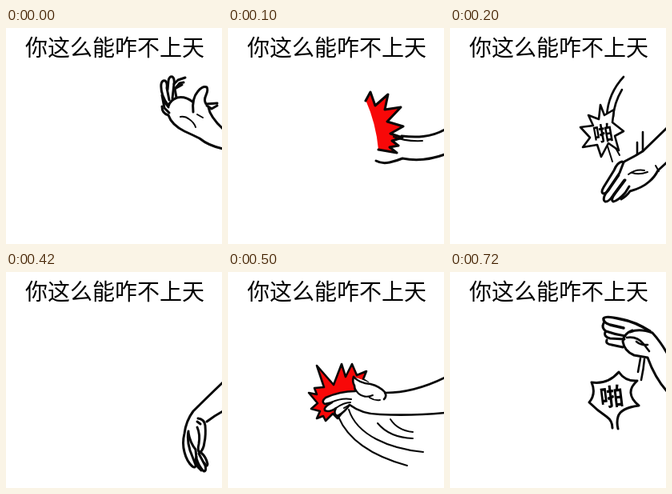
An HTML page that plays this animation: 270x270 px, repeating every 800 ms.

```html
<!DOCTYPE html>
<html lang="zh-CN">
<head>
<meta charset="utf-8">
<title>你这么能咋不上天</title>
<style>
html, body { margin: 0; width: 100%; height: 100%; overflow: hidden; background: #fff; }
svg { display: block; width: 100%; height: 100%; }
text { font-family: "Noto Sans CJK SC", "Noto Sans CJK", sans-serif; fill: #000; stroke: none; }
.pose { fill: none; stroke: #080808; stroke-width: 3; stroke-linecap: round; stroke-linejoin: round; opacity: 0; }
.thin { stroke-width: 2; }
.mid { stroke-width: 2.6; }
.bold { stroke-width: 3.4; }
.skin { fill: #fff; }
.bare { fill: #fff; stroke: none; }
.red { fill: #f80808; }
.flat { fill: #f80808; stroke: none; }
.slap { font-weight: 700; text-anchor: middle; }
</style>
</head>
<body>
<svg viewBox="0 0 270 270">
  <rect width="270" height="270" fill="#fff"/>
  <text x="24" y="35" font-size="28">你这么能咋不上天</text>

  <g class="pose" id="raised">
    <path d="M203 97C197 90 193 79 194 70Q195 65 199 66Q202 68 201 75L204 90"/>
    <path d="M202 77L203 66Q204 60 208 61Q211 63 210 70L208 88"/>
    <path d="M210 70L215 65L224 62M212 75L217 69L222 68M213 87L211 76L220 71"/>
    <path d="M195 84L198 100L204 106M198 92L203 99M203 98Q205 90 214 87Q224 85 233 92"/>
    <path d="M195 98Q195 107 203 109Q207 121 223 129Q234 134 242 138Q253 147 271 151"/>
    <path d="M234 105Q232 88 240 79Q246 72 251 74Q253 77 250 84Q247 90 250 95L264 94M251 97L257 101L264 97M253 99Q255 111 271 126"/>
    <path class="thin" d="M218 111Q224 110 229 114Q235 118 237 124M239 108L246 112"/>
  </g>

  <g class="pose" id="impact">
    <path class="flat" d="M172 90L178 80L184 97L200 83L196 102L216 99L199 117L219 123L203 132L218 137L207 142L214 148L203 149L211 157L188 152Q185 119 172 90Z"/>
    <path d="M172 91L178 80L184 97L200 83L196 102L216 99L199 117L219 123L203 132L218 137L205 141L213 147L202 149L211 156L188 152"/>
    <path d="M217 135C235 137 253 137 271 127M185 166Q192 170 202 168Q211 166 218 163Q244 168 271 158"/>
    <path class="thin" d="M207 136Q222 142 243 141"/>
  </g>

  <g class="pose" id="downswing">
    <path class="mid" d="M217 61C204 75 197 91 196 110M215 77Q205 94 204 111"/>
    <path class="thin" d="M197 148L203 167M207 150L212 159"/>
    <path class="skin mid" d="M188 96L193 109L205 102L203 118L217 129L206 135L211 153L198 144L189 161L184 146L166 149L175 137L163 124L179 122L173 109L186 114Z"/>
    <text class="slap" x="191" y="141" font-size="25" transform="rotate(-10 191 131)">啪</text>
    <path d="M271 125L241 154L231 160L216 168"/>
    <path class="mid" d="M241 130V154M234 143V158"/>
    <path d="M215 167Q209 168 205 178L192 199Q188 206 192 207Q196 207 200 200L211 184"/>
    <path d="M217 168L212 181L195 206Q190 215 194 217Q198 218 204 209L218 190"/>
    <path d="M219 190L207 206Q200 215 204 217Q210 216 219 206L224 198M214 214Q221 210 225 204Q240 200 249 192Q256 186 260 178L271 168"/>
    <path class="thin" d="M223 183Q232 176 243 178M228 181Q236 184 247 180M257 172L261 179"/>
  </g>

  <g class="pose" id="hanging">
    <path d="M271 138Q251 157 234 174Q225 186 223 202Q220 214 223 225Q226 237 233 243Q237 246 237 241L230 223Q226 210 228 199"/>
    <path d="M271 174Q260 180 251 187M240 183Q248 184 249 192Q250 204 248 213Q247 222 242 226Q239 223 241 215Q243 203 239 194"/>
    <path d="M228 201Q230 213 237 222L238 233Q241 243 247 249Q251 249 249 242L241 227"/>
    <path d="M244 226Q250 231 252 240Q251 245 248 239M238 231Q236 237 240 244L244 248M239 187L243 190"/>
  </g>

  <g class="pose" id="backhand">
    <path class="red mid" d="M108 145L120 144L111 117L132 141L142 115L147 131L155 115L161 129L173 124L169 134L175 138L151 166L137 183L131 177L122 186L119 180L111 183L115 174L104 171L112 164L101 151L111 153Z"/>
    <path class="bare" d="M157 131Q157 142 159 149Q140 149 122 157Q116 162 121 165L130 163Q119 169 121 173Q127 176 135 170Q131 178 137 180Q146 175 152 166Q168 177 190 178L198 152Q184 139 157 131Z"/>
    <path class="mid" d="M157 131Q155 137 158 142L159 149Q140 149 122 157Q116 162 121 165L130 163Q119 169 121 173Q127 176 135 170Q131 178 137 180Q146 175 152 166"/>
    <path class="mid" d="M157 131Q164 139 178 140Q190 143 197 151Q232 151 271 132M152 166Q168 178 190 178Q228 180 271 176M196 151Q199 155 195 159"/>
    <path class="thin" d="M129 163Q142 157 154 159M135 170Q145 163 153 163M159 146Q162 153 169 155Q174 157 181 154M177 157Q183 161 190 160M145 170L152 166"/>
    <path class="thin" d="M138 181C151 212 184 231 224 242M151 172C161 204 202 221 244 225M187 189Q202 207 231 208M203 184Q212 198 231 200"/>
  </g>

  <g class="pose" id="upswing">
    <path class="bold" d="M250 74Q231 62 214 59Q194 54 192 58Q191 63 200 66L217 70"/>
    <path d="M192 64Q189 70 195 74Q206 78 219 80M194 75Q192 81 200 83L218 84M196 85Q194 90 202 91L216 94"/>
    <path d="M228 73Q217 77 216 87Q218 99 230 104L247 107M225 75Q237 70 253 76Q263 87 271 101M247 107Q256 132 271 149"/>
    <path class="mid" d="M221 82Q234 80 242 90L249 99M233 87Q239 92 247 91M238 108L235 125M243 109Q242 121 239 135"/>
    <path class="skin" d="M203 195Q203 186 196 181Q184 173 174 163Q183 152 177 138Q197 141 211 125Q219 137 234 136Q217 151 236 167Q213 170 210 181Q208 188 210 196"/>
    <text class="slap" x="202" y="167" font-size="30" transform="rotate(-7 202 156)">啪</text>
  </g>
</svg>
<script>
const LOOP = 800;
const steps = [
  ["raised", 0, 100],
  ["impact", 100, 200],
  ["downswing", 200, 300],
  ["hanging", 300, 500],
  ["backhand", 500, 600],
  ["upswing", 600, 800],
];
const start = document.timeline.currentTime || 0;

for (const [id, from, to] of steps) {
  const frames = [{ offset: from / LOOP, opacity: 1 }];
  if (from > 0) frames.unshift({ offset: 0, opacity: 0 });
  if (to < LOOP) frames.push({ offset: to / LOOP, opacity: 0 });
  frames.push({ offset: 1, opacity: to < LOOP ? 0 : 1 });
  for (const frame of frames) frame.easing = "step-end";
  const pose = document.getElementById(id);
  pose.animate(frames, { duration: LOOP, iterations: Infinity }).startTime = start;
}
</script>
</body>
</html>
```
